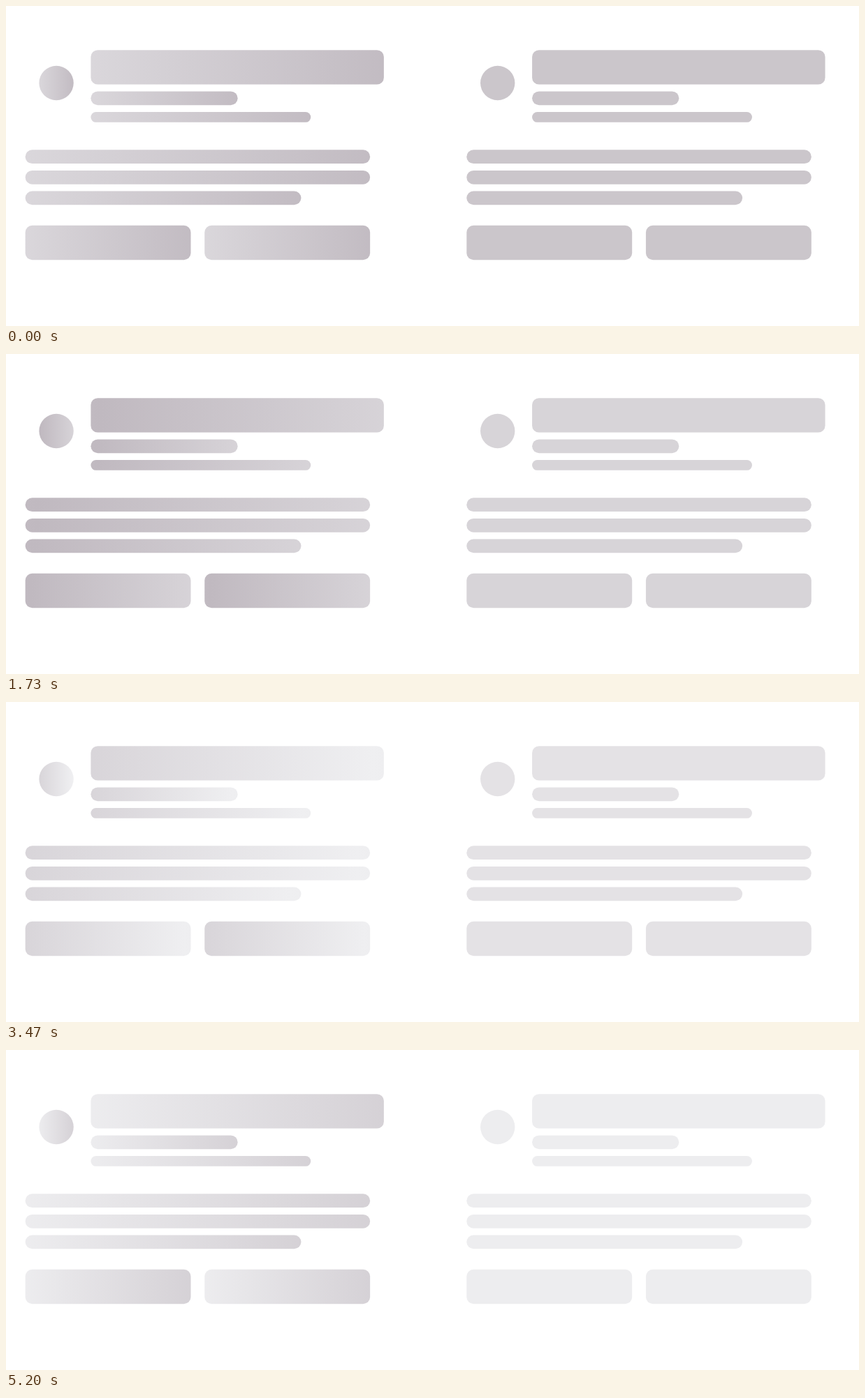
An HTML page that plays this animation: 1221 px wide and 459 px high, repeating every 5340 ms.

```html
<!DOCTYPE html>
<html lang="en">
<head>
<meta charset="utf-8">
<title>Skeleton loaders</title>
<style>
  :root { --dark: #c0b9c0; --light: #efeff1; }
  html, body { margin: 0; width: 100%; height: 100%; overflow: hidden; background: #fff; }
  .stage {
    position: absolute; left: 28px; top: 64px; display: flex; gap: 140px;
    transform: scale(.987); transform-origin: -28px -64px;
  }
  .card { position: relative; flex: none; width: 500px; }
  .card i { display: block; height: 20px; margin-bottom: 10px; border-radius: 10px; }
  .card .avatar { position: absolute; left: 20px; top: 23px; width: 50px; height: 50px; border-radius: 50%; }
  .head { width: 85%; margin: 0 0 40px 95px; }
  .head .thin { width: 75%; height: 15px; margin: 0; }
  .half { width: 50%; }
  .short { width: 80%; }
  .card .tall { height: 50px; }
  .buttons { display: flex; justify-content: space-between; margin-top: 30px; }
  .buttons i { width: 48%; }

  /* one gradient cycle spans four block widths */
  .wave i {
    background: repeating-linear-gradient(90deg,
      var(--dark) calc(var(--shift) * -100%),
      var(--light) calc((2 - var(--shift)) * 100%),
      var(--dark) calc((4 - var(--shift)) * 100%));
  }
  .pulse i { background: color-mix(in srgb, var(--light) calc(var(--glow) * 100%), var(--dark)); }
</style>
</head>
<body>
<div class="stage">
  <div class="card wave">
    <i class="avatar"></i>
    <div class="head">
      <i class="tall"></i>
      <i class="half"></i>
      <i class="thin"></i>
    </div>
    <i></i>
    <i></i>
    <i class="short"></i>
    <div class="buttons">
      <i class="tall"></i>
      <i class="tall"></i>
    </div>
  </div>
</div>
<script>
  const wave = document.querySelector('.wave');
  const pulse = wave.cloneNode(true);
  pulse.className = 'card pulse';
  wave.after(pulse);

  const LOOP = 5340, STEPS = 40, FPS = 7.5;
  const mod = (a, n) => ((a % n) + n) % n;
  const style = document.documentElement.style;

  // The picture advances in steps that land on whole hundredths of a second.
  function draw() {
    const ticks = Math.floor((performance.now() % LOOP) / 10);
    const step = Math.min(STEPS - 1, Math.floor((ticks + .5) * FPS / 100));
    const s = step / FPS;
    style.setProperty('--shift', mod(2.9 - 4 * s, 4).toFixed(4));
    style.setProperty('--glow', (1 - Math.abs(mod(s - .232, 2) - 1)).toFixed(4));
    requestAnimationFrame(draw);
  }
  draw();
</script>
</body>
</html>
```
